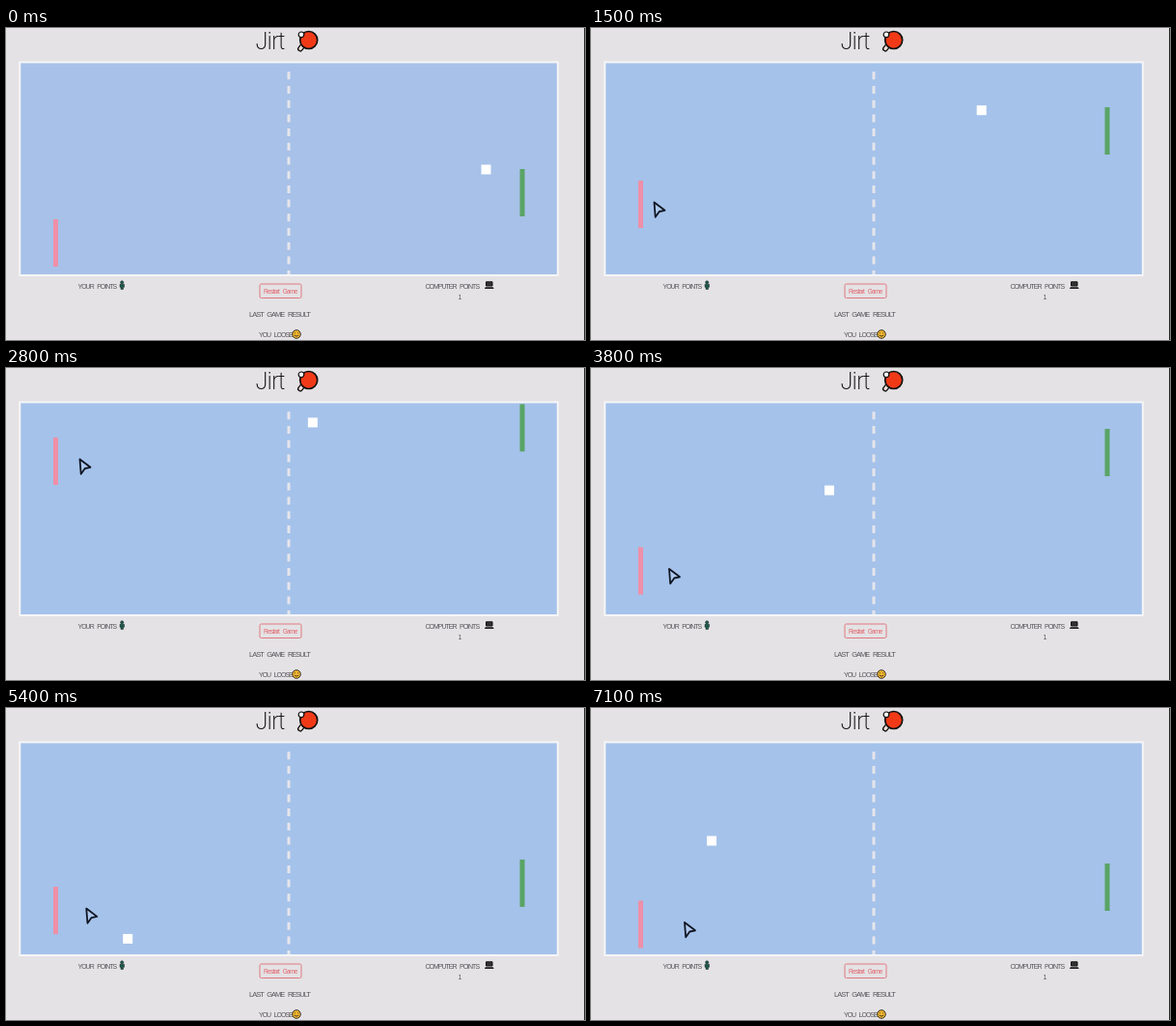
An HTML page with a canvas that plays this animation: 600 by 323 pixels, repeating every 7.2 s.

```html
<!DOCTYPE html>
<html lang="en">
<head>
<meta charset="utf-8">
<title>Paddle game</title>
<style>
  html, body { margin: 0; width: 100%; height: 100%; overflow: hidden; background: #e4e2e4; }
  svg, canvas { position: absolute; left: 0; top: 0; width: 600px; height: 323px; }
  text { font: 7px "Liberation Sans", sans-serif; letter-spacing: -1px; word-spacing: 2.5px; fill: #56555a; }
  .title { font: 200 24px Inter, "Liberation Sans", sans-serif; fill: #111; }
  .button { font-size: 6.5px; letter-spacing: -.7px; fill: #e2646d; }
  .wide { font-size: 7.5px; }
</style>
</head>
<body>
<svg viewBox="0 0 600 323">
  <rect x="599" width="1" height="323" fill="#29292b"/>
  <text class="title" x="258" y="22">Jirt</text>

  <!-- bat and ball -->
  <path d="M309 16.500l-4 5" stroke="#111" stroke-width="6" stroke-linecap="round"/>
  <path d="M309 16.500l-4 5" stroke="#f6ded6" stroke-width="3.200" stroke-linecap="round"/>
  <circle cx="313.700" cy="12.500" r="9" fill="#f03a17" stroke="#111" stroke-width="1.700"/>
  <circle cx="306" cy="6.800" r="2.800" fill="#fff" stroke="#111" stroke-width="1.200"/>

  <rect id="field" x="14.300" y="35.400" width="557.500" height="220.600" fill="#a5c2ea" stroke="#f5f5f7" stroke-width="2"/>
  <path d="M293 45.300V255" stroke="#e6e5eb" stroke-width="3" stroke-dasharray="8 6.700"/>

  <text x="74.500" y="269.500">YOUR POINTS</text>
  <g fill="#1d5a4c" stroke="#142422" stroke-width=".5">
    <circle cx="120.200" cy="263.300" r="1.600"/>
    <path d="M118 265.300h4.500v3h-1v2.200h-2.500v-2.200h-1z"/>
  </g>

  <text x="434.500" y="269.500">COMPUTER POINTS</text>
  <path d="M497.500 262.800h6.500v4.200h-6.500z" fill="#333" stroke="#111"/>
  <path d="M496.800 268.300h7.900l1 1.700h-9.900z" fill="#1b1b1b"/>
  <text x="468.500" y="280.500">1</text>

  <rect x="263" y="265" width="43" height="14.500" rx="1.500" fill="none" stroke="#e07880"/>
  <text class="button" x="267" y="274.500">Restart Game</text>
  <text class="wide" x="252" y="298.500">LAST GAME RESULT</text>
  <text x="262" y="320">YOU LOOSE!</text>
  <circle cx="301" cy="317" r="4.300" fill="#f5b82e" stroke="#222" stroke-width=".9"/>
  <path d="M299.300 315.200v1M302.700 315.200v1M298.700 318q2.300 2.300 4.600 0" fill="none" stroke="#222" stroke-width=".8"/>
</svg>
<canvas id="stage"></canvas>
<script>
const LOOP = 7200, STEP = 100;
const field = document.getElementById("field");
const canvas = document.getElementById("stage");
const ctx = canvas.getContext("2d");
const ratio = window.devicePixelRatio || 1;
canvas.width = 600 * ratio;
canvas.height = 323 * ratio;

const PADDLE_BOUNCE_X = 56.5;
const GRIP = 22;            // cursor tip below the top of the player's paddle
const CURSOR_SHOWN = 800;

// Key points: [ms, y] for ball bounces and paddle turns, [ms, x, y] for the hand.
const bounces = [[0, 146.5], [2580, 41], [5558, 250], [7100, 137.5]];
const chase = [[0, 146], [1500, 82], [2900, 37], [3800, 63], [6200, 181], [7100, 161]];
const hand = [[700, 62, 220], [1500, 65, 180], [2800, 76, 94], [3800, 80.5, 207.5],
  [4700, 74.5, 205.5], [6100, 93, 210.5], [7100, 96.5, 221.5]];

function segment(keys, t) {
  let i = 0;
  while (i < keys.length - 2 && t >= keys[i + 1][0]) i++;
  return i;
}

function rate(keys, i, axis) {
  const a = keys[i], b = keys[i + 1];
  return (b[axis] - a[axis]) / (b[0] - a[0]);
}

function linear(keys, t) {
  const i = segment(keys, t);
  return keys[i][1] + rate(keys, i, 1) * (t - keys[i][0]);
}

// Harmonic-mean tangents avoid overshoot at turning points.
function tangent(keys, i, axis) {
  if (i === 0) return rate(keys, 0, axis);
  if (i === keys.length - 1) return rate(keys, i - 1, axis);
  const a = rate(keys, i - 1, axis), b = rate(keys, i, axis);
  return a * b <= 0 ? 0 : 2 * a * b / (a + b);
}

function smooth(keys, t, axis = 1) {
  const i = segment(keys, t), a = keys[i], b = keys[i + 1];
  const span = b[0] - a[0], u = Math.max(0, Math.min(1, (t - a[0]) / span));
  const ease = u * u * (3 - 2 * u);
  return a[axis] + (b[axis] - a[axis]) * ease
    + span * u * (1 - u) * ((1 - u) * tangent(keys, i, axis) - u * tangent(keys, i + 1, axis));
}

// The ball speeds up steadily and reflects off the player's paddle.
function ballX(t) {
  const n = t / STEP;
  const x = 497.5 - 5.92 * n - 0.0177 * n * n;
  return PADDLE_BOUNCE_X + Math.abs(x - PADDLE_BOUNCE_X);
}

function box(x, y, w, h, color) {
  ctx.fillStyle = color;
  ctx.fillRect(x, y, w, h);
}

function drawCursor(x, y) {
  ctx.save();
  ctx.translate(x, y);
  ctx.beginPath();
  ctx.moveTo(.5, .5);
  ctx.lineTo(11.5, 8.8);
  ctx.lineTo(5.8, 10);
  ctx.lineTo(1.7, 15.7);
  ctx.closePath();
  ctx.fillStyle = "#adc8ee";
  ctx.strokeStyle = "#101522";
  ctx.lineWidth = 1.8;
  ctx.lineJoin = "round";
  ctx.fill();
  ctx.stroke();
  ctx.restore();
}

function draw(t) {
  const cursorY = smooth(hand, t, 2);
  ctx.setTransform(ratio, 0, 0, ratio, 0, 0);
  ctx.clearRect(0, 0, 600, 323);
  field.setAttribute("fill", t < CURSOR_SHOWN ? "#a7c1e8" : "#a5c2ea");
  box(49, cursorY - GRIP, 5, 49, "#ee8fa8");
  box(532.5, smooth(chase, t), 5, 49, "#59a465");
  box(ballX(t) - 5, linear(bounces, t) - 5, 10, 10, "#fff");
  if (t >= CURSOR_SHOWN) drawCursor(smooth(hand, t), cursorY);
}

const start = performance.now();
function tick() {
  const t = (performance.now() - start) % LOOP;
  draw(Math.floor(t / STEP) * STEP);
  requestAnimationFrame(tick);
}
tick();
</script>
</body>
</html>
```
